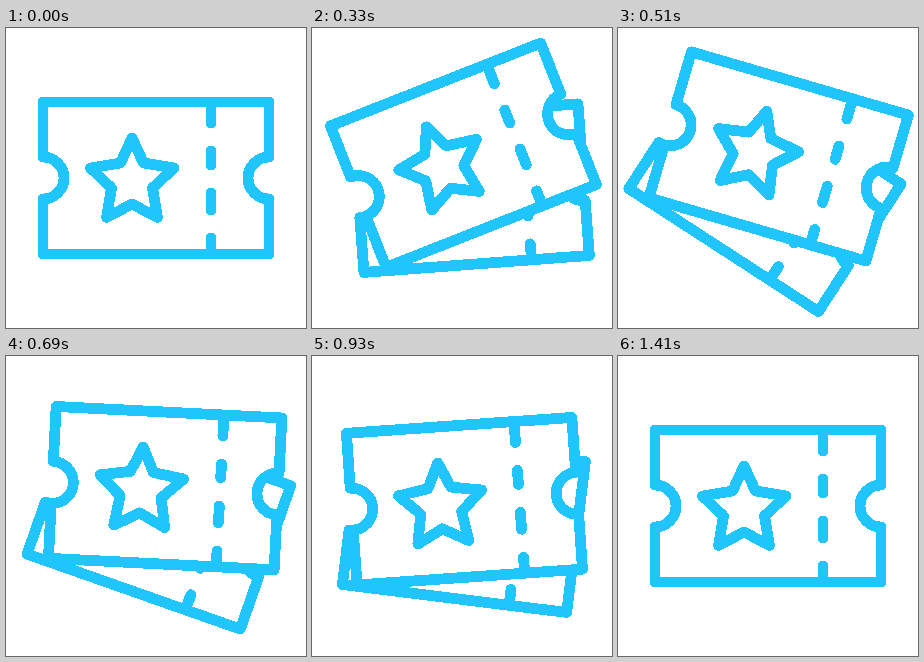
Recreate the animation shown at these times as an HTML page. Size 300 by 300 pixels, loop 1.5 s.

```html
<!DOCTYPE html>
<html lang="en">
<head>
<meta charset="utf-8">
<title>Tickets</title>
<style>
  html, body { margin: 0; width: 100%; height: 100%; overflow: hidden; background: #fff; }
  svg { display: block; width: 100vw; height: 100vh; shape-rendering: crispEdges; }
  .ticket { fill: #fff; stroke: #20c5fb; stroke-width: 10.8; stroke-linecap: round; stroke-linejoin: round; }
</style>
</head>
<body>
<svg viewBox="0 0 300 300">
  <defs>
    <g id="base">
      <path d="M37 74H263V129A21 21 0 0 0 263 171V226H37V171A21 21 0 0 0 37 129Z"/>
      <path d="M205 74V95M205 123V137M205 165V182M205 210V226"/>
    </g>
  </defs>
  <g id="back" class="ticket"><use href="#base"/></g>
  <g id="front" class="ticket">
    <use href="#base"/>
    <path d="M126 110L137.500 135L168 140L146.500 160L151.500 189.500L126 176L100.500 189.500L105.500 160L84.500 140L114.500 135Z"/>
  </g>
</svg>
<script>
const LOOP = 1500, STEP = 30;
const front = document.getElementById('front');
const back = document.getElementById('back');

const sine = p => (1 - Math.cos(Math.PI * p)) / 2;
const easeIn = p => p ** 3.4;

// Eased progress from 0 to 1 between two times
const ramp = (t, from, to, ease = sine) =>
  ease(Math.min(1, Math.max(0, (t - from) / (to - from))));

// Turning points of the decaying swing: [time, degrees]
const swing = [[0, 0], [333, -21.5], [535, 17.7], [820, -8.3], [1095, 4.1], [1405, 0]];

const angleAt = t => swing.slice(1).reduce((sum, [time, deg], i) =>
  sum + (deg - swing[i][1]) * ramp(t, swing[i][0], time), 0);

function draw(t) {
  const lift = ramp(t, 0, 333);
  const cross = ramp(t, 333, 535);
  const away = 1 - ramp(t, 535, 1110);
  const x = (1.4 * lift + 9.6 * cross) * away;
  const y = (1.3 * cross - 22.8 * lift) * away;
  const spread = (17.2 * lift - 0.5 * cross) * (1 - ramp(t, 535, 1080, easeIn));

  const pose = `translate(${x} ${y}) rotate(${angleAt(t)} 150 150)`;
  front.setAttribute('transform', pose);
  // The back ticket fans out around the left notch.
  back.setAttribute('transform', `${pose} rotate(${spread} 37 150)`);
}

const start = performance.now();
function tick() {
  const t = (performance.now() - start) % LOOP;
  draw(Math.floor(t / STEP) * STEP);
  requestAnimationFrame(tick);
}
draw(0);
requestAnimationFrame(tick);
</script>
</body>
</html>
```
